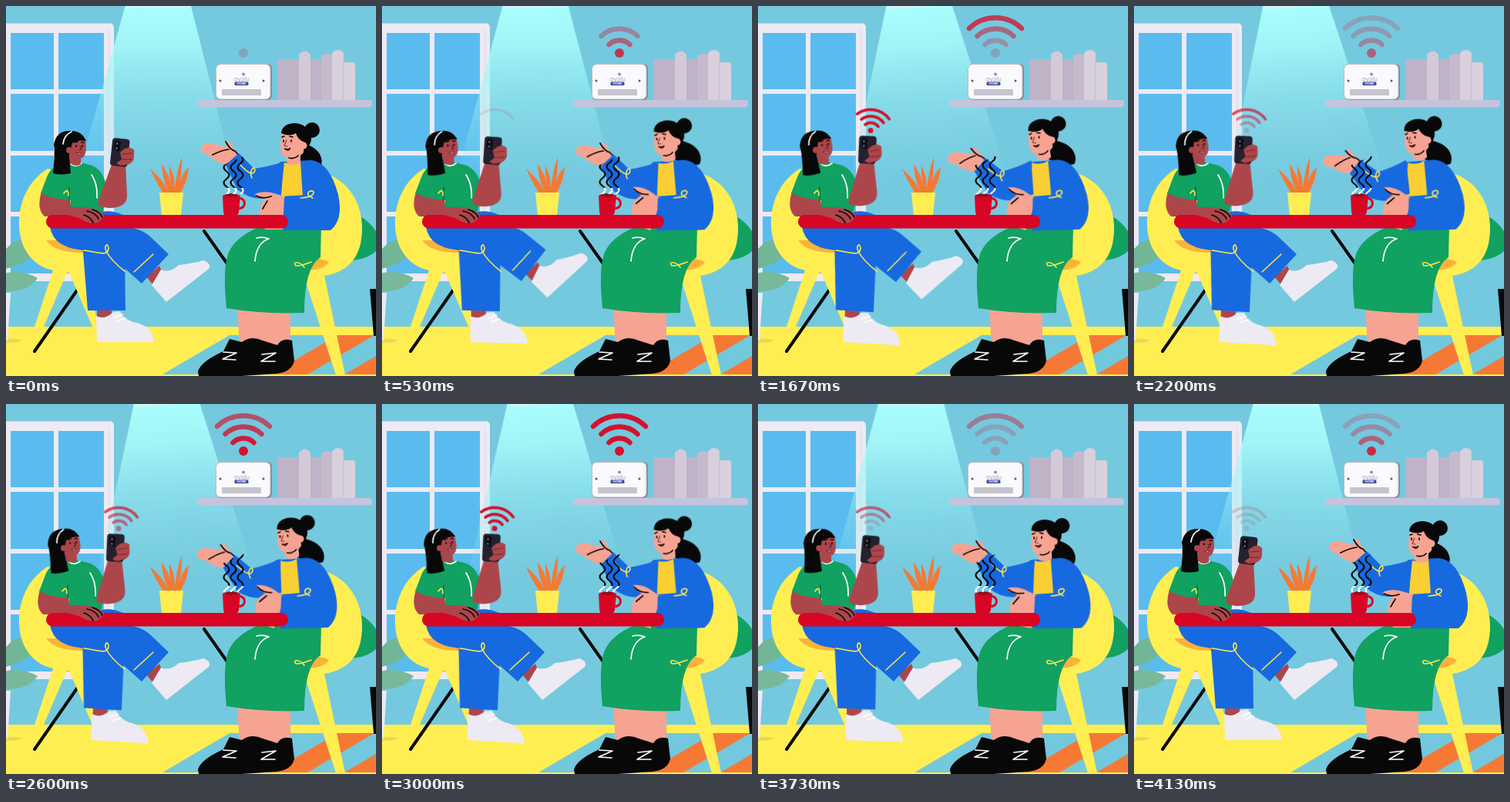
Write an HTML page that moves like this. It is 480 px wide and 480 px high and loops after 4190 ms.

```html
<!DOCTYPE html>
<html lang="en">
<head>
<meta charset="utf-8">
<title>Coffee table chat</title>
<style>
html, body { margin: 0; width: 100%; height: 100%; overflow: hidden; background: #74c9df; }
svg { display: block; width: 100vw; height: 100vh; }
.m { animation: 4190ms ease-in-out infinite; }
.line { fill: none; stroke-linecap: round; stroke-linejoin: round; }
.ink { stroke: #080808; stroke-width: 1.7; }
.stitch { stroke: #ffe94f; stroke-width: 1.6; }
.white { stroke: #fff; stroke-width: 1.7; }
.blue { fill: #1769e0; }
.green { fill: #11a160; }
.yellow { fill: #ffee52; }
.red { fill: #d80525; }
.pale { fill: #edeaf3; }
.brown { fill: #ad464b; }
.pink { fill: #f6a392; }
.orange { fill: #f57935; }
.wave { stroke: #d4122c; }
.wave circle { fill: #d4122c; stroke: none; }
.wave > * { animation: 4190ms linear infinite; }

#beam { animation-name: beam; transform-origin: 197px -165px; }
@keyframes beam { 50% { transform: rotate(-4.2deg); } }

#headL { animation-name: headL; transform-origin: 72px 215px; }
@keyframes headL {
  0%, 98%, 100% { transform: none; }
  12.6%, 81% { transform: translate(-2px, 1px) rotate(-6deg); }
  27%, 72% { transform: translate(-3px, 1px) rotate(-8deg); }
}
#phoneArm { animation-name: phoneArm; transform-origin: 140px 255px; }
@keyframes phoneArm {
  0%, 98%, 100% { transform: none; }
  12.6%, 81% { transform: translate(-2px, -2px) rotate(-2deg); }
  27%, 72% { transform: translate(-2px, -3px) rotate(-3.4deg); }
}
#torsoL { animation-name: torsoL; }
@keyframes torsoL { 0%, 98%, 100% { transform: none; } 14%, 81% { transform: translateX(-2px); } }
#shinL { animation-name: shinL; transform-origin: 115px 310px; }
@keyframes shinL {
  0%, 98%, 100% { transform: none; }
  12.6% { transform: rotate(1.5deg); }
  27%, 81% { transform: rotate(3.4deg); }
}
#kick { animation-name: kick; transform-origin: 140px 300px; }
@keyframes kick {
  0%, 53%, 100% { transform: none; }
  12.6% { transform: rotate(-4.6deg); }
  27% { transform: rotate(-5.6deg); }
}

#bodyR { animation-name: bodyR; transform-origin: 375px 290px; }
@keyframes bodyR {
  0%, 98%, 100% { transform: none; }
  12.6%, 72%, 81% { transform: translateX(-2.5px) rotate(-1deg); }
  27%, 53% { transform: translateX(-3.5px) rotate(-1.4deg); }
}
#headR { animation-name: headR; transform-origin: 378px 204px; }
@keyframes headR {
  0%, 98%, 100% { transform: none; }
  12.6%, 72%, 81% { transform: translate(3px, -4px) rotate(-4deg); }
  27%, 53% { transform: translate(4px, -6px) rotate(-6deg); }
}
#tail { animation-name: tail; }
@keyframes tail { 0%, 98%, 100% { transform: none; } 13%, 81% { transform: translate(8px, -3px); } }
#armR { animation-name: armR; transform-origin: 340px 235px; }
@keyframes armR {
  0%, 98%, 100% { transform: none; }
  12.6%, 71.6% { transform: translateX(3px) rotate(-.5deg); }
  27% { transform: translateX(4px) rotate(-4deg); }
  52.5% { transform: translateX(4px) rotate(-9deg); }
  81% { transform: translateX(3px) rotate(-2deg); }
}
#restHand { animation-name: restHand; transform-origin: 352px 262px; }
@keyframes restHand { 0%, 98%, 100% { transform: none; } 13%, 81% { transform: translate(-1px, -1px) rotate(20deg); } }

#steam { animation: rise 1396.67ms linear infinite; }
@keyframes rise { to { transform: translateY(-20px); } }

.wave .r0 { animation-name: r0; } .wave .r1 { animation-name: r1; }
.wave .r2 { animation-name: r2; } .wave .r3 { animation-name: r3; }
.wave .p0 { animation-name: p0; } .wave .p1 { animation-name: p1; }
.wave .p2 { animation-name: p2; } .wave .p3 { animation-name: p3; }
@keyframes r0 { 0% { opacity: .2 } 17%, 29% { opacity: 1 } 37%, 44% { opacity: .2 } 52.5% { opacity: .55 } 60%, 72.5% { opacity: 1 } 81%, 89% { opacity: .2 } 98.6%, 100% { opacity: .85 } }
@keyframes r1 { 0%, 4% { opacity: 0 } 12.6% { opacity: .55 } 20%, 31% { opacity: 1 } 41%, 46% { opacity: .2 } 52.5% { opacity: .35 } 63%, 75% { opacity: 1 } 81% { opacity: .45 } 86%, 91% { opacity: .2 } 98.6%, 100% { opacity: .55 } }
@keyframes r2 { 0%, 6% { opacity: 0 } 12.6% { opacity: .35 } 24%, 34% { opacity: 1 } 44%, 49% { opacity: .2 } 52.5% { opacity: .25 } 66%, 77% { opacity: 1 } 81% { opacity: .7 } 89%, 94% { opacity: .2 } 98.6%, 100% { opacity: .33 } }
@keyframes r3 { 0%, 12.7% { opacity: 0 } 26%, 37% { opacity: 1 } 47%, 53.5% { opacity: .2 } 69%, 81% { opacity: 1 } 92%, 100% { opacity: .2 } }
@keyframes p0 { 0%, 13% { opacity: 0 } 27% { opacity: .7 } 34%, 42% { opacity: 1 } 52.5%, 59% { opacity: .2 } 67%, 73% { opacity: 1 } 81% { opacity: .35 } 87%, 100% { opacity: .15 } }
@keyframes p1 { 0%, 13% { opacity: 0 } 27% { opacity: .65 } 36%, 44% { opacity: 1 } 52.5% { opacity: .35 } 58% { opacity: .3 } 68%, 75% { opacity: 1 } 81% { opacity: .6 } 90%, 100% { opacity: .15 } }
@keyframes p2 { 0%, 13% { opacity: 0 } 27% { opacity: .5 } 38%, 46% { opacity: 1 } 52.5% { opacity: .5 } 58% { opacity: .4 } 70%, 77% { opacity: 1 } 81% { opacity: .8 } 94%, 100% { opacity: .18 } }
@keyframes p3 { 0%, 8% { opacity: 0 } 12.6% { opacity: .12 } 27% { opacity: .35 } 40%, 48% { opacity: 1 } 52.5% { opacity: .7 } 58% { opacity: .6 } 71%, 82% { opacity: 1 } 97%, 100% { opacity: .2 } }
</style>
</head>
<body>
<svg viewBox="0 0 480 480">
  <defs>
    <linearGradient id="light" x1="0" y1="0" x2="0" y2="235" gradientUnits="userSpaceOnUse">
      <stop offset="0" stop-color="#a8fefc"/>
      <stop offset=".22" stop-color="#a8fbfa" stop-opacity=".85"/>
      <stop offset=".5" stop-color="#9cf1f5" stop-opacity=".5"/>
      <stop offset="1" stop-color="#8cdcea" stop-opacity="0"/>
    </linearGradient>
    <clipPath id="steamTop"><path d="M276 209L312 193V236H276Z"/></clipPath>
    <clipPath id="steamEnd"><path d="M276 236H312V244H276Z"/></clipPath>
    <g id="steam" class="line" stroke-width="2.1">
      <path id="curl" d="M286 185q-7 5 0 10t0 10t0 10t0 10t0 10t0 10t0 10t0 10t0 10"/>
      <use href="#curl" x="9"/><use href="#curl" x="18"/>
    </g>
  </defs>

  <rect width="480" height="480" fill="#74c9df"/>

  <!-- window -->
  <rect x="-10" y="22.500" width="150" height="334.500" rx="5" class="pale"/>
  <path fill="#5abcee" d="M6 35H62V108H6ZM68 35H127V108H68ZM6 114H62V188H6ZM68 114H127V188H68ZM6 194H62V267H6ZM68 194H127V267H68ZM6 273H62V347H6ZM68 273H127V347H68Z"/>
  <path d="M133.500 30V350" class="line" stroke="#dedbe8"/>

  <g id="beam" class="m">
    <path fill="url(#light)" d="M158 -12L237 -12L299 235H89Z"/>
    <path d="M155 0H240" stroke="#dceef3" stroke-width="3"/>
  </g>

  <!-- shelf -->
  <rect x="248" y="122" width="227" height="9.500" rx="4.500" fill="#c6c4dd"/>
  <path fill="#bfb3c8" d="M352 72Q352 69 355 69H381V122H352ZM395 69H412V122H395Z"/>
  <path fill="#d3c9d7" d="M380 63Q388 54 395 63V122H380Z"/>
  <path fill="#c6bacd" d="M409 64Q417 59 424 64V122H409Z"/>
  <path fill="#d8d0dc" d="M423 61Q431 53 438 61V73H450Q453 73 453 77V122H423Z"/>
  <path d="M438 62V122" stroke="#c6bacd"/>
  <rect x="273" y="75" width="72" height="47" rx="6" fill="#85858f"/>
  <rect x="272.500" y="75.500" width="70.500" height="45.500" rx="6" fill="#fafafc" stroke="#b9b9c6"/>
  <circle cx="278" cy="97" r="1.500" fill="#555a66"/>
  <circle cx="334" cy="97" r="1.500" fill="#555a66"/>
  <circle cx="308" cy="88.500" r="2" fill="#8793c8"/>
  <text x="306" y="97.500" text-anchor="middle" font-family="Lato, sans-serif" font-size="8.500" fill="#a3aac8">ovalu</text>
  <rect x="296.500" y="98.500" width="18" height="4.500" rx="1.500" fill="#37459f"/>
  <text x="305.500" y="102.300" text-anchor="middle" font-family="Inter, sans-serif" font-size="4" font-weight="700" fill="#fff">HOME</text>
  <rect x="280" y="108" width="51" height="8" rx="1" fill="#c5c4cf"/>
  <g class="line wave" stroke-width="6.500">
    <circle class="r0" cx="308" cy="61" r="6"/>
    <path class="r1" d="M294.500 50A19.500 19.500 0 0 1 321.500 50"/>
    <path class="r2" d="M284.500 39A34 34 0 0 1 331.500 39"/>
    <path class="r3" d="M274 29A49 49 0 0 1 342 29"/>
  </g>

  <!-- floor and plants -->
  <rect y="416" width="480" height="64" class="yellow"/>
  <path fill="#72c8dc" d="M290 427H480V478H203Z"/>
  <path class="orange" d="M343 478L430 427H478L391 478ZM439 478L480 454V478Z"/>
  <path fill="#e9d75b" d="M0 432Q15 431 22 434Q15 437 0 437Z"/>
  <path fill="#71b797" d="M-2 318Q8 304 20 303Q26 318 37 322Q20 338 -2 341Z"/>
  <path fill="#78b99c" d="M-2 347Q20 341 41 353Q29 371 -2 370Z"/>
  <path class="pale" d="M0 372H6L2 434H0Z"/>
  <path class="green" d="M450 268Q472 278 481 294V317Q470 328 450 330Z"/>
  <path fill="#080808" d="M472 367H480V428H477Z"/>

  <!-- chairs -->
  <path class="line" stroke="#080808" stroke-width="4" d="M108 346L37 448M257 292L286 333"/>
  <path class="yellow" d="M54 211C30 226 16 253 17 285C18 316 36 338 61 343L37 416H49L79 346H82L112 416H120L103 343L125 300L110 225Z"/>
  <path fill="#f9b23a" d="M52 304H102V320Q65 321 52 304Z"/>
  <path class="yellow" d="M400 214C440 219 462 252 462 288C462 326 444 345 413 350L440 479H428L387 352L380 300Z"/>
  <path fill="#f9b23a" d="M386 330Q403 324 419 332Q413 343 386 343Z"/>

  <!-- left figure, legs -->
  <g id="shinL" class="m">
    <path class="brown" d="M118 390H137V407H118Z"/>
    <path class="pale" d="M117 402Q128 408 139 397L148 396Q151 405 165 410Q190 414 192 436H118Z"/>
    <path class="line" stroke="#fff" stroke-width="1.500" d="M140 405L151 400M144 409L155 405"/>
    <path class="blue" d="M99 306L106 395H155L154 320Z"/>
  </g>
  <g id="kick" class="m">
    <path class="brown" d="M182 351L199 337L203 346L191 362Z"/>
    <path class="pale" d="M189 362L201 342Q213 347 224 336Q242 334 256 330Q267 334 263 341L208 384Z"/>
    <path class="blue" d="M110 288H164Q180 291 190 302L211 322L176 360L148 335L105 310Z"/>
    <path class="line stitch" d="M166 345L191 322"/>
  </g>
  <path class="blue" d="M57 286L116 270Q132 262 152 271L156 338L131 316Q62 323 57 286Z"/>
  <path class="line stitch" d="M101 317C118 319 133 326 133 314C132 306 127 311 130 318Q136 330 154 344"/>

  <!-- left figure, torso -->
  <g id="torsoL" class="m">
    <path class="brown" d="M46 241Q39 263 50 273H112L111 266L84 257L82 247Z"/>
    <path class="green" d="M78 203Q59 206 53 222L45 243Q62 251 84 252L83 273H124L130 250Q133 217 112 207L97 203Z"/>
    <path class="line white" d="M84 205Q91 210 98 204M111 219Q119 231 118 249"/>
    <path class="line" stroke="#0b6e46" stroke-width="1.500" d="M82 235V253"/>
    <path class="line stitch" stroke-width="1.200" d="M75 243Q81 235 81 246"/>
  </g>
  <g id="phoneArm" class="m">
    <path class="brown" d="M120 252L137 206L155 203L157 244Q158 258 144 261Q130 264 119 258Z"/>
    <path class="brown" d="M139 190Q151 181 160 184Q168 187 166 195Q167 202 158 206L142 209Z"/>
    <rect x="136.500" y="172" width="22.500" height="36" rx="4" fill="#25212f" transform="rotate(6 148 190)"/>
    <path fill="#0d0d15" d="M141 175Q148 173 149 177L147 188Q142 189 140 184Z"/>
    <path class="line" stroke="#77727e" stroke-width="2" d="M144 178V179M143.500 184V185"/>
    <path class="brown" d="M148 190Q157 181 164 185Q169 188 164 192Q169 196 163 200Q161 207 148 207L143 204L150 199Z"/>
    <path class="line" stroke="#6d272f" stroke-width="1" d="M151 192L163 191M151 199L163 199"/>
  </g>
  <g id="headL" class="m">
    <path class="brown" d="M82 190L97 195V205Q90 210 83 204Z"/>
    <path class="brown" d="M78 173Q92 163 103 174Q106 192 99 197Q91 201 82 193Z"/>
    <path fill="#080808" d="M61 217Q64 187 62 180Q65 162 82 162Q98 161 104 175Q92 173 86 178L82 193L84 217Q70 220 61 217Z"/>
    <path class="line white" d="M74 179Q75 168 85 163"/>
    <circle cx="82" cy="187" r="4" class="brown"/>
    <path class="line ink" d="M91 181V182.500M99 181V182.500M89 177L93 176M98 177L101 177"/>
    <path class="line" stroke="#541d24" stroke-width="1.200" d="M96 182L98 186L95 187"/>
    <path fill="#fff" stroke="#541d24" stroke-width=".8" d="M91 190.500Q95 192 98 190Q96 195 91 190.500Z"/>
  </g>
  <g transform="rotate(9 146 162)"><g class="line wave" stroke-width="3.800">
    <circle class="p0" cx="146" cy="161.500" r="3.500"/>
    <path class="p1" d="M138 155A12 12 0 0 1 155 155"/>
    <path class="p2" d="M132 149A20.500 20.500 0 0 1 161 149"/>
    <path class="p3" d="M125.500 143A30 30 0 0 1 167.500 143"/>
  </g></g>

  <!-- right figure, lower body -->
  <path class="pink" d="M300 389H369V440H303Z"/>
  <path fill="#080808" d="M249 474Q253 461 282 448L290 432L306 436Q318 427 333 434L352 440Q358 430 371 434L374 460Q371 475 350 477L306 480H250Z"/>
  <path class="line white" d="M282 449L299 450L281 458L298 459M332 452L350 450L331 461L349 461"/>
  <path class="green" d="M330 286H409L408 326Q387 339 387 398Q333 400 286 392Q281 342 288 322Q296 300 330 286Z"/>
  <path class="line white" d="M323 331C324 315 331 305 341 302Q333 299 325 301"/>
  <path class="line stitch" d="M396 332Q384 337 376 337C371 332 380 330 387 339"/>

  <!-- right figure, upper body -->
  <g id="bodyR" class="m">
    <path id="tail" class="m" fill="#080808" d="M374 176Q399 179 407 192Q412 202 408 209Q392 214 375 202Z"/>
    <path class="blue" d="M356 202L396 200Q420 203 431 245Q438 277 421 291H361L350 270V208Z"/>
    <path fill="#f9cf33" d="M361 203Q372 207 382 201L385 247L356 249Z"/>
    <path class="blue" d="M356 247L410 244V290H363L358 271Z"/>
    <g id="armR" class="m">
      <path class="pink" d="M253 185Q254 178 265 178L286 183L286 176Q290 173 293 180L304 197L291 208Q271 203 263 194L254 190Z"/>
      <path class="line ink" d="M268 193Q280 187 289 186M285 176Q291 187 297 188L304 196"/>
      <path class="blue" d="M302 191L322 211Q343 208 360 202L357 246L331 250Q315 250 300 238L285 206Z"/>
      <path class="line stitch" d="M303 205Q320 224 323 213C322 206 315 213 319 223"/>
    </g>
    <g id="headR" class="m">
      <path class="pink" d="M365 190H382V203Q372 209 364 203Z"/>
      <path class="pink" d="M358 163Q374 156 387 169L386 190Q378 200 364 197Q355 193 356 180Z"/>
      <circle cx="397" cy="161" r="10" fill="#080808"/>
      <path fill="#080808" d="M357 165Q358 154 372 152Q388 151 395 166Q399 177 388 188L386 176Q379 174 376 165Q368 170 357 165Z"/>
      <circle cx="386" cy="181" r="4.500" class="pink"/>
      <path class="line ink" d="M360 174V176M370 174V176M358 170L361 169M368 169L372 170"/>
      <path class="line" stroke="#733a38" stroke-width="1.200" d="M364 174L361 181L365 182"/>
      <path fill="#a92334" stroke="#080808" d="M361 185Q365 186.500 369 184.500Q367 190 361 185Z"/>
      <path class="line ink" d="M367 197Q374 199 379 194"/>
    </g>
    <g id="restHand" class="m">
      <path class="pink" d="M362 247L344 242Q331 240 323 244Q321 248 330 249L336 251Q327 260 330 271L336 290H362Z"/>
      <path class="line ink" d="M324 246Q333 251 344 247M339 253L333 263"/>
    </g>
    <path class="blue" d="M361 249Q384 243 417 248V291H359Z"/>
    <path class="line stitch" d="M382 249Q400 248 399 241C394 237 386 245 398 249"/>
  </g>

  <!-- table -->
  <path class="orange" d="M204 243Q192 224 187 211Q202 224 210 239Q202 220 202 205Q212 219 215 236Q211 218 212 207Q219 219 219 237Q222 211 228 196Q229 217 223 238Q227 218 237 209Q236 227 226 243Z"/>
  <path class="yellow" d="M199 242H230L227 272H202Z"/>
  <circle cx="303" cy="256" r="6.500" fill="none" stroke="#d80525" stroke-width="3"/>
  <path class="red" d="M281 246Q292 240 304 246L302 268Q300 273 294 273H287Q282 272 282 266Z"/>
  <path fill="#87131f" d="M283 246Q292 241 302 246Q292 249 283 246Z"/>
  <g clip-path="url(#steamTop)"><use href="#steam" stroke="#080808"/></g>
  <g clip-path="url(#steamEnd)"><use href="#steam" stroke="#fff"/></g>
  <rect x="52" y="271" width="314" height="17.500" rx="8.500" class="red"/>
  <path class="brown" d="M80 261Q101 260 117 264Q127 269 127 274L119 281Q108 284 97 276L80 271Z"/>
  <path class="line ink" stroke-width="1" d="M105 266Q116 268 120 276M112 264Q122 267 125 274M101 271Q110 274 113 281"/>
</svg>
</body>
</html>
```
